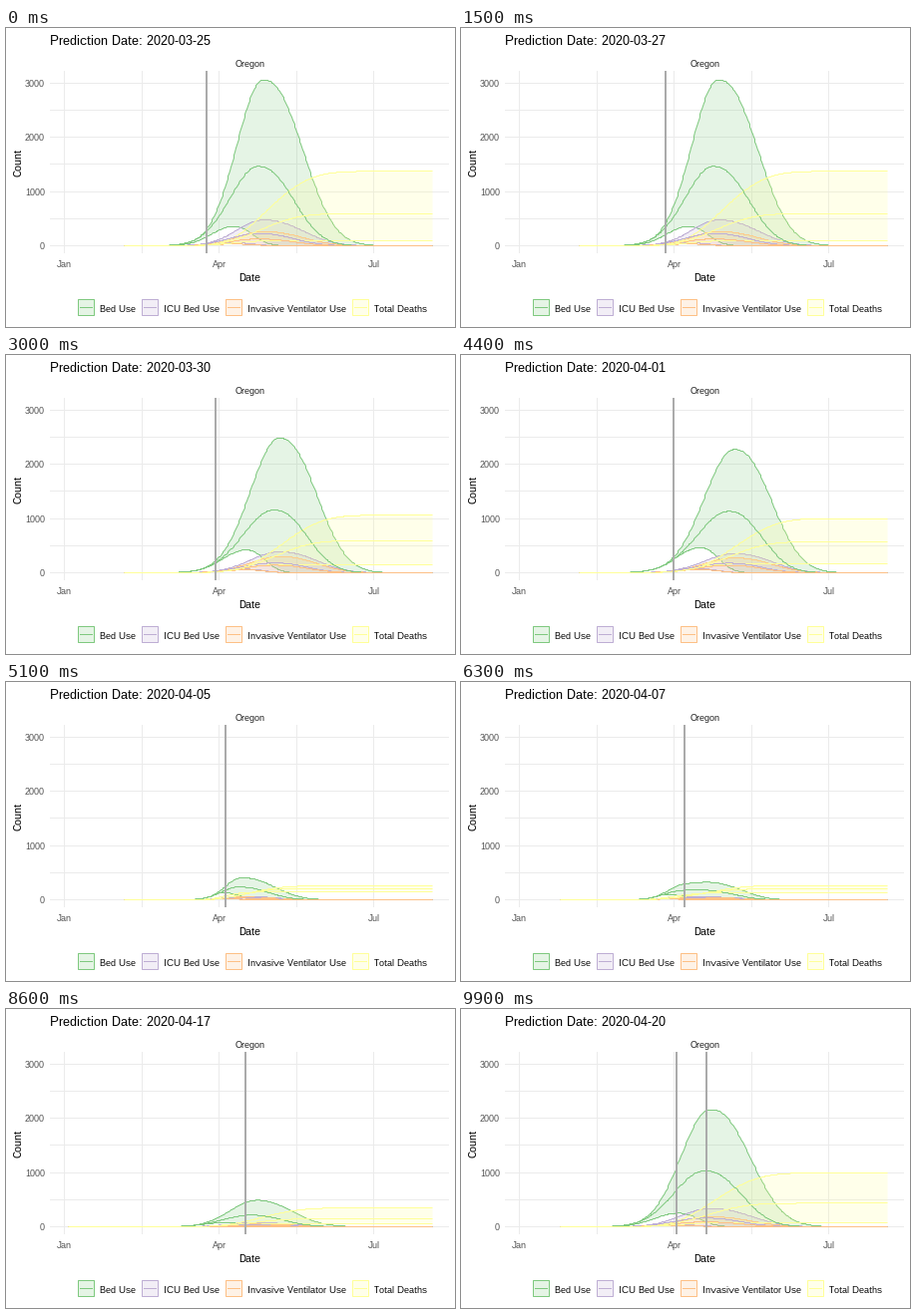
A matplotlib script that plays this animation: 450x300 px, repeating every 10 s.

```python
import numpy as np
import matplotlib as mpl
import matplotlib.pyplot as plt
from matplotlib.animation import FuncAnimation
from matplotlib.patches import Polygon, Rectangle

mpl.rcParams.update({
    "font.family": "Liberation Sans",
    "text.hinting": "native",
    "text.hinting_factor": 1,
    "path.snap": False,
})

W, H, DPI = 450, 300, 72
LEFT, RIGHT, TOP, BOTTOM = 44, 444, 43, 226
ZERO, UNIT = 218.5, 0.0545          # pixel row of 0, pixels per count
DAY, LAST_X = 1.7033, 427           # pixels per day, end of all curves
GRID, RULE, TICK = "#EBEBEB", "#ABABAB", "#4D4D4D"
GROUPS = [("Bed Use", "#7FC97F", 72), ("ICU Bed Use", "#BEAED4", 136),
          ("Invasive Ventilator Use", "#FDC086", 220),
          ("Total Deaths", "#FFFF99", 347)]
U = np.linspace(0, 1, 366)


def bump(x, height, center, left, right):
    """Skewed bell curve with separate widths on both sides."""
    d = np.abs(x - center)
    return height * np.exp(-0.5 * np.where(x < center, (d / left) ** 2,
                                           (d / right) ** 2.3))


def forecast(start, center, left, right, beds, deaths, vent=0.12):
    """Rows: x, then (low, mid, high) for each of the four groups."""
    x = start + U * (LAST_X - start)
    low, mid, high = beds
    low = bump(x, low, center - 1.15 * left, 0.8 * left, 0.5 * right)
    mid = bump(x, mid, center - 0.2 * left, 1.05 * left, 0.9 * right)
    high = np.maximum(bump(x, high, center, left, right), mid)
    bed = np.array([np.minimum(low, mid), mid, high])
    # Deaths add up in step with the occupied beds
    share = np.cumsum(bed, axis=1)
    share /= share[:, -1:]
    total = share * np.reshape(deaths, (3, 1))
    return np.vstack([x, bed, 0.155 * bed, vent * bed, total])


def mix(a, b, t):
    return a + (b - a) * t


march = forecast(118, 258, 26.5, 38, (355, 1460, 3055), (90, 590, 1370), 0.085)
late = forecast(118, 274, 29, 36, (420, 1155, 2480), (150, 590, 1060))
april = forecast(118, 274, 30, 36, (460, 1130, 2270), (165, 570, 1000))
flat = forecast(118, 236, 16, 32, (130, 235, 405), (140, 205, 255))
wide = forecast(62, 248, 24, 27, (90, 240, 450), (110, 190, 270))
tall = forecast(62, 256, 25, 37, (85, 255, 640), (50, 235, 610))
final = forecast(62, 246, 26, 34, (75, 200, 430), (45, 115, 235), 0.085)

# Days after 25 March; days between two key forecasts blend them
KEYS = {0: march, 2: march, 5: late, 7: april, 11: flat, 13: flat,
        14: wide, 16: tall, 26: final}
DAYS = [0, 1, 2, 4, 5, 6, 7, 11, 13, 14, 16, 19, 23, 26]
STARTS = [4, 13, 20, *range(28, 99, 7)]


def curves_on(day):
    before = max(d for d in KEYS if d <= day)
    after = min(d for d in KEYS if d >= day)
    t = (day - before) / max(after - before, 1)
    return mix(KEYS[before], KEYS[after], t)


STATES = [curves_on(day) for day in DAYS]


def pose(frame):
    """Index of the shown state and progress towards the next one."""
    state = 0
    for i, start in enumerate(STARTS):
        steps = 4 if i == 2 else 3
        if frame < start:
            break
        done = frame - start + 1
        if done < steps:
            return i, done / steps
        state = i + 1
    return state, 0.0


def rule_x(day):
    return np.floor(200.73 + DAY * day)


def pixel(v):
    """Centre of the pixel that holds v."""
    return np.floor(v) + 0.5


fig = plt.figure(figsize=(W / DPI, H / DPI), dpi=DPI, facecolor="white")
ax = fig.add_axes([0, 0, 1, 1])
ax.set_xlim(0, W)
ax.set_ylim(H, 0)
ax.axis("off")


def line(x, y, color, z):
    return ax.plot(x, y, color=color, lw=1, zorder=z, snap=False,
                   solid_capstyle="butt")[0]


def label(x, y, text, size, color="black", **kw):
    return ax.text(x, y, text, fontsize=size, color=color,
                   va=kw.pop("va", "baseline"), **kw)


def box(x, y, w, h, **kw):
    return ax.add_patch(Rectangle((x, y), w, h, snap=False, **kw))


# Grid and axis text
for count in range(0, 3001, 500):
    row = pixel(ZERO - UNIT * count)
    line([LEFT, RIGHT], [row, row], GRID, 1)
    if count % 1000 == 0:
        label(39, row + 3.5, str(count), 9, TICK, ha="right")
for i, month in enumerate(("Jan", "", "Apr", "", "Jul")):
    col = pixel(58.5 + 77.5 * i)
    line([col, col], [TOP, BOTTOM], GRID, 1)
    label(col, 240, month, 9, TICK, ha="center")
label(244.5, 39, "Oregon", 9, "#1A1A1A", ha="center")
label(244.5, 254, "Date", 11, ha="center")
label(12, 135, "Count", 11, ha="center", va="center", rotation=90)
title = label(44, 17, "", 13)

# Legend
for name, color, x in GROUPS:
    box(x, 272, 17, 17, fc=color, alpha=0.2, lw=0)
    box(x + 0.5, 272.5, 16, 16, fill=False, ec=color, lw=1)
    line([x + 2, x + 15], [280.5] * 2, color, 3)
    label(x + 22, 285, name, 9.4)

# Moving parts
ribbons, curves = [], []
for g, (_, color, _) in enumerate(GROUPS):
    z = 4 + 0.2 * g
    ribbons.append(ax.add_patch(Polygon([(0, 0)] * 3, fc=color, alpha=0.2,
                                        lw=0, zorder=z)))
    curves.append([line([], [], color, k) for k in (z + 0.1, z + 2, z + 0.1)])
rule, old_rule = (box(0, TOP, 2, BOTTOM - TOP, fc=RULE, lw=0, zorder=8)
                  for _ in range(2))


def draw(frame):
    i, t = pose(frame)
    now, then = i % len(DAYS), (i + 1) % len(DAYS)
    day = DAYS[now]
    x, *counts = mix(STATES[now], STATES[then], t)
    x = pixel(x)
    rows = pixel(ZERO - UNIT * np.array(counts))
    for g in range(4):
        low, _, high = band = rows[3 * g:3 * g + 3]
        ribbons[g].set_xy(np.column_stack([np.r_[x, x[::-1]],
                                           np.r_[high, low[::-1]]]))
        for curve, y in zip(curves[g], band):
            curve.set_data(x, y)
    rule.set_x(rule_x(mix(day, DAYS[then], t)))
    # The last rule lingers while the loop closes
    old_rule.set_x(rule_x(day))
    old_rule.set_visible(then == 0)
    title.set_text(f"Prediction Date: {np.datetime64('2020-03-25') + day}")
    return []


anim = FuncAnimation(fig, draw, frames=100, interval=100, repeat=True,
                     repeat_delay=0, init_func=lambda: draw(0), blit=False)
plt.show()
```
